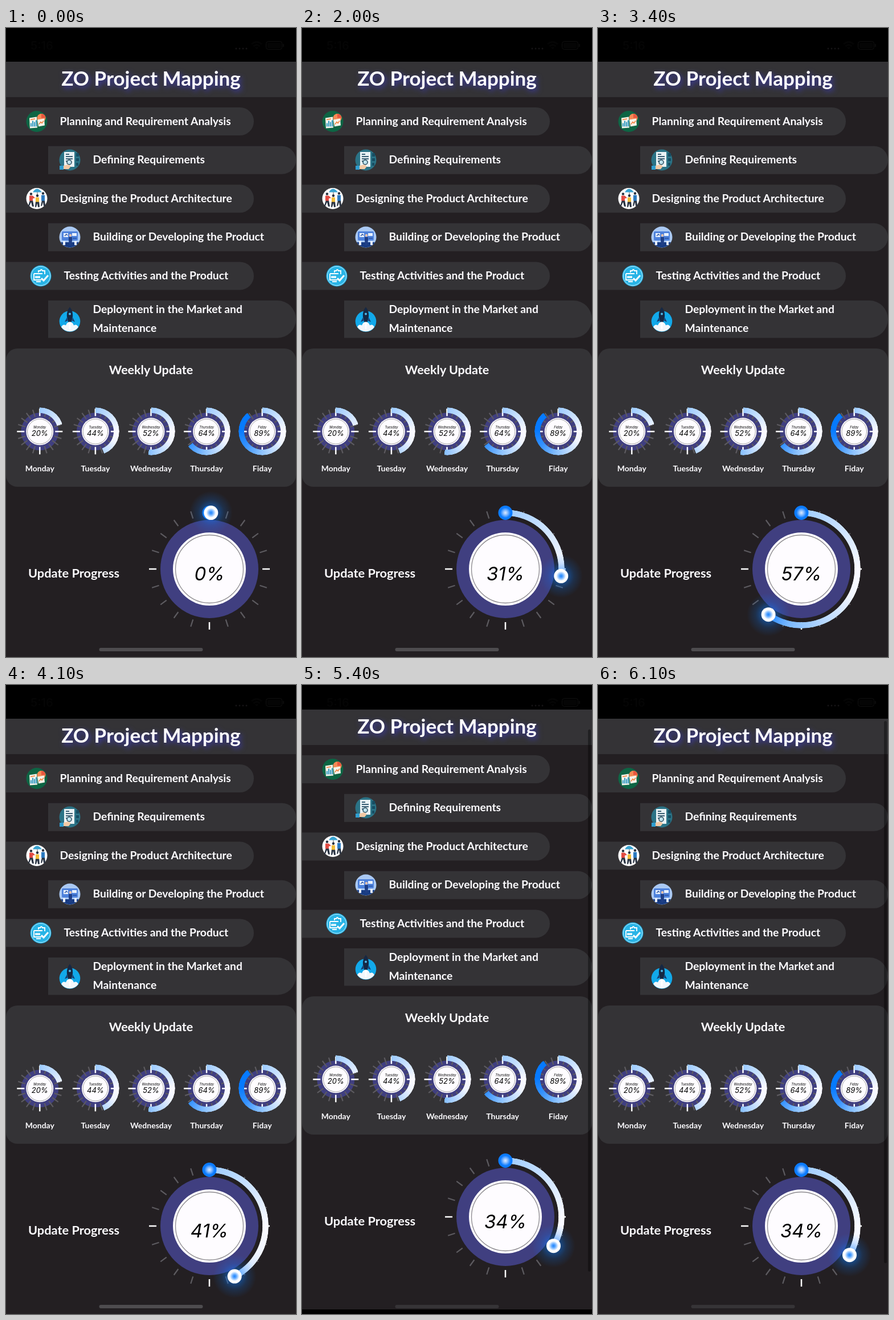
These frames come from a looping animation (509 px wide and 1101 px high, 6.2 s). An HTML page:

```html
<!DOCTYPE html>
<html lang="en">
<head>
<meta charset="utf-8">
<title>Project planning</title>
<style>
  html, body { margin: 0; width: 100%; height: 100%; overflow: hidden; background: #000; }
  #stage { position: relative; width: 509px; height: 1101px; overflow: hidden; background: #000; }
  #page { position: absolute; left: 0; top: 0; width: 509px; height: 1109px; }
  svg { position: absolute; left: 0; top: 0; overflow: visible; }
  text { font-family: Lato, sans-serif; font-weight: 700; fill: #fdfcff; }
  text.mid { text-anchor: middle; }
  text.num { font-family: Inter, sans-serif; font-weight: 400; font-style: italic; fill: #000; text-anchor: middle; }
  .title { filter: drop-shadow(3px 4px 5px #3b3aa6); }
  .ring, .sweep { position: absolute; border-radius: 50%; }
  .sweep {
    inset: 0;
    background: conic-gradient(#9ccbff 0, #fbfaff 25%, #f1f5ff 33%, #8cc2ff 51%, #3491ff 64%, #067aff 76%, #067aff);
  }
</style>
</head>
<body>
<div id="stage">
  <div id="page">
    <svg id="base" width="509" height="1109">
      <rect y="59" width="509" height="1050" fill="#231f22"/>
      <g fill="#343336">
        <rect y="59" width="509" height="62"/>
        <rect y="561" width="509" height="242" rx="20"/>
        <g id="cards"></g>
      </g>
      <text class="mid title" x="254.5" y="101" font-size="35">ZO Project Mapping</text>
      <text class="mid" x="254.5" y="606" font-size="21.5">Weekly Update</text>
      <text x="39" y="962" font-size="21.8">Update Progress</text>

      <g transform="translate(54 163.5)">
        <circle r="18.5" fill="#0d6544"/>
        <circle cx="8" cy="-6" r="7.5" fill="#f58a55"/>
        <path d="M8-6V-13.5A7.5 7.5 0 0 1 15.5-6Z" fill="#e9573f"/>
        <path d="M-13-6 0-8 1 11-12 12ZM1-3 13-5 14 7 3 9Z" fill="#f6f3ea"/>
        <path d="M-10 9V3M-7 9V-1M-4 9V1M-1 9V-2" stroke="#2f9ac4" stroke-width="2"/>
        <path d="M-11-3-3-4.5M4 5 7 1 9 3 12-1" fill="none" stroke="#f0803c" stroke-width="1.5"/>
      </g>
      <g transform="translate(112 231)">
        <circle r="18.5" fill="#2b7386"/>
        <rect x="-10" y="-14" width="18" height="26" fill="#e9f2f5"/>
        <path d="M-7-10H-1M-7-6H5M-7-2H5M-7 2H2" stroke="#3a6075" stroke-width="1.8"/>
        <path d="M11-12h5v6h-5zM11-3h5v5h-5zM11 5h4v5h-4z" fill="#164d63"/>
        <circle cx="-1" cy="4" r="4" fill="#bfe3ee" stroke="#24485a" stroke-width="1.5"/>
        <path d="M-18 10H-11V17H-18Z" fill="#2f9ed0"/>
        <path d="M-11 10-3 8 2 11-2 16H-11Z" fill="#f3c9a5"/>
      </g>
      <g transform="translate(54 298.5)">
        <circle r="18.5" fill="#fdfdfd"/>
        <path d="M-7-11Q0-23 9-11Z" fill="#38a3d1"/>
        <path d="M1-11V-3" stroke="#555" stroke-width="1"/>
        <g fill="#26303f">
          <circle cx="-10" cy="-8" r="2.2"/><circle cx="1" cy="-5" r="2.2"/><circle cx="11" cy="-9" r="2.2"/>
          <path d="M-12 3H-7L-5 14H-8L-10 6-13 13H-15ZM-2 5H4L5 15H2L1 8-1 15H-3ZM9 3H14L15 13H12L11 6 9 13H7Z"/>
        </g>
        <path d="M-13-5H-7L-3-1-7 0V4H-13Z" fill="#e24b43"/>
        <path d="M-2-2H4V6H-2Z" fill="#f2bd38"/>
        <path d="M8-6H14V4H8Z" fill="#2b7ac0"/>
      </g>
      <g transform="translate(112 366)">
        <circle r="18.5" fill="#aac9f3"/>
        <path d="M-16 9H16A18.5 18.5 0 0 1-16 9Z" fill="#183c83"/>
        <rect x="-14" y="-10" width="28" height="16" rx="2" fill="#4e82dc"/>
        <path d="M-11-7H-3V0H-11ZM4-7H12V-2H4Z" fill="#e7f1ff"/>
        <path d="M-9-2-6-5-4-3M5 2H12" fill="none" stroke="#234e9d" stroke-width="1.3"/>
        <circle cx="1" cy="-3" r="2.2" fill="#f4c3a8"/>
        <path d="M-2 0H4V6L3 14H-1L-2 6Z" fill="#1f3f86"/>
        <path d="M-12 14V7H-8V14M8 14V7H12V14" fill="#e8effb"/>
      </g>
      <g transform="translate(61 434)" fill="none" stroke="#fff" stroke-width="1.8">
        <circle r="18.5" fill="#28b4e6" stroke="none"/>
        <circle r="16.6" stroke="#b9e8fa" stroke-width="1"/>
        <path d="M-4-6V-9H-1Q1-13 3-9H7V-3M-12-4H3M-12-4V7H1M-8 10H0"/>
        <path d="M-10 0H-1V4H-10Z" fill="#d9f3fc" stroke="none"/>
        <path d="M1 4 5 8 13-1" stroke-width="3"/>
      </g>
      <g transform="translate(112 511.5)">
        <circle cy="2" r="18.3" fill="#12a9ea"/>
        <path d="M-15 12Q-12 6-7 9-4 2 0 4 4 2 7 9 12 6 15 12A18.3 18.3 0 0 1-15 12Z" fill="#f2f7fc"/>
        <path d="M-2 2H2L1 16H-1Z" fill="#fff"/>
        <path d="M-5-5-9 3-4 1ZM5-5 9 3 4 1Z" fill="#173b70"/>
        <path d="M0-23Q6-16 5-6L3 3H-3L-5-6Q-6-16 0-23Z" fill="#152844"/>
        <circle cy="-11" r="2" fill="#4fb9e9"/>
      </g>
      <g id="dials"></g>
    </svg>
    <div id="rings"></div>
    <svg id="knobs" width="509" height="1109">
      <defs>
        <radialGradient id="capFill">
          <stop offset="0" stop-color="#dcebff"/><stop offset=".3" stop-color="#8fc0ff"/>
          <stop offset=".72" stop-color="#0b7bff"/><stop offset="1" stop-color="#0b7bff"/>
        </radialGradient>
        <radialGradient id="knobFill">
          <stop offset="0" stop-color="#1b84ff"/><stop offset=".25" stop-color="#5aa6ff"/>
          <stop offset=".68" stop-color="#fff"/><stop offset="1" stop-color="#fff"/>
        </radialGradient>
        <radialGradient id="glowFill">
          <stop offset=".25" stop-color="#0b7bff" stop-opacity=".5"/>
          <stop offset=".6" stop-color="#0b7bff" stop-opacity=".18"/>
          <stop offset="1" stop-color="#0b7bff" stop-opacity="0"/>
        </radialGradient>
      </defs>
      <circle cx="357" cy="848.5" r="12.5" fill="url(#capFill)"/>
      <g id="knob">
        <circle r="38" fill="url(#glowFill)"/>
        <circle r="12.5" fill="url(#knobFill)"/>
      </g>
    </svg>
  </div>
  <svg width="509" height="1101">
    <g id="status">
      <text x="43" y="37.5" font-size="20" style="font-family:Inter,sans-serif;font-weight:600;fill:#050505">5:16</text>
      <g fill="#161416">
        <circle cx="404" cy="36" r="1.5"/><circle cx="410" cy="36" r="1.5"/>
        <circle cx="416" cy="36" r="1.5"/><circle cx="422" cy="36" r="1.5"/>
      </g>
      <g fill="none" stroke="#050505" stroke-width="3">
        <path d="M431 28.5Q440 20.500 449 28.500M434.500 32Q440 27 445.500 32"/>
        <path d="M440 37.500 437 34.500Q440 32 443 34.500Z" fill="#050505" stroke="none"/>
        <rect x="456.500" y="23.500" width="28" height="14" rx="4" stroke="#111" stroke-width="1"/>
        <rect x="458.500" y="25.500" width="24" height="10" rx="2.500" fill="#050505" stroke="none"/>
        <path d="M487 28V33" stroke="#111" stroke-width="1.500"/>
      </g>
    </g>
    <rect id="bar" x="502" width="5" rx="2.5" fill="#000" opacity=".38"/>
    <rect id="home" x="163.500" y="1085" width="182" height="6" rx="3"/>
  </svg>
</div>
<script>
const LOOP = 6200, STEP = 100, SCROLL_START = 4800;
const $ = id => document.getElementById(id);

function add(parent, tag, attrs, content = '') {
  const node = document.createElementNS('http://www.w3.org/2000/svg', tag);
  for (const key in attrs) node.setAttribute(key, attrs[key]);
  node.textContent = content;
  return parent.appendChild(node);
}

// Tasks: side, top, height, text x, lines
const tasks = [
  ['left', 139, 49, 94.5, 'Planning and Requirement Analysis'],
  ['right', 206.7, 49, 152.5, 'Defining Requirements'],
  ['left', 274.3, 49, 94.5, 'Designing the Product Architecture'],
  ['right', 341.8, 49, 152.5, 'Building or Developing the Product'],
  ['left', 409.4, 49, 101.5, 'Testing Activities and the Product'],
  ['right', 477, 65.5, 152.5, 'Deployment in the Market and', 'Maintenance']
];
for (const [side, top, height, textX, ...lines] of tasks) {
  const r = height / 2, x = side === 'left' ? 0 : 74;
  add($('cards'), 'path', { d: `M${x} ${top}h${435 - r}a${r} ${r} 0 0 1 0 ${height}h${r - 435}z` });
  lines.forEach((line, i) => add($('cards'), 'text', {
    x: textX, y: top + r + 6 + (i - (lines.length - 1) / 2) * 33, 'font-size': 19.3
  }, line));
}

function makeRing(x, y, inner, outer) {
  const ring = document.createElement('div'), sweep = document.createElement('div');
  const mask = `radial-gradient(circle, transparent ${inner - .4}px, #000 ${inner + .4}px)`;
  ring.className = 'ring';
  sweep.className = 'sweep';
  Object.assign(ring.style, {
    left: x - outer + 'px', top: y - outer + 'px',
    width: outer * 2 + 'px', height: outer * 2 + 'px', webkitMaskImage: mask, maskImage: mask
  });
  ring.append(sweep);
  $('rings').append(ring);
  return percent => {
    const cut = `conic-gradient(#000 ${percent}%, transparent ${percent + .1}%)`;
    sweep.style.webkitMaskImage = cut;
    sweep.style.maskImage = cut;
  };
}

function makeDial(x, y, size) {
  const g = add($('dials'), 'g', { transform: `translate(${x} ${y})` });
  add(g, 'circle', { r: size.disc, fill: '#403f80' });
  for (let i = 0; i < 20; i++) {
    const major = i % 5 === 0;
    add(g, 'path', {
      d: `M0 ${-size.tickIn}V${-size.tickOut}`, transform: `rotate(${i * 18})`,
      stroke: major ? '#fff' : '#5d5b60', 'stroke-width': major ? 2.5 : 2.2
    });
  }
  add(g, 'circle', { r: size.face, fill: '#fefcff' });
  add(g, 'circle', { r: size.line, fill: 'none', stroke: '#8d8b8f', 'stroke-width': size.lineWidth });
  return { g, setArc: makeRing(x, y, size.arcIn, size.arcOut) };
}

const small = { disc: 33, tickIn: 27, tickOut: 40, face: 24, line: 21.8, lineWidth: .8, arcIn: 32, arcOut: 42 };
const large = { disc: 86, tickIn: 93, tickOut: 106, face: 64, line: 59.5, lineWidth: 1.3, arcIn: 93.2, arcOut: 103.8 };

const days = [['Monday', 20], ['Tuesday', 44], ['Wednesday', 52], ['Thursday', 64], ['Fiday', 89]];
days.forEach(([day, percent], i) => {
  const x = 59.3 + i * 97.6;
  const { g, setArc } = makeDial(x, 706.3, small);
  setArc(percent);
  add(g, 'text', { class: 'num', y: -5.5, 'font-size': 5.7 }, day);
  add(g, 'text', { class: 'num', y: 8, 'font-size': 13 }, percent + '%');
  add(g, 'text', { class: 'mid', y: 69.5, 'font-size': 14 }, day);
});

const progress = makeDial(357, 947, large);
const progressText = add(progress.g, 'text', { class: 'num', y: 20, 'font-size': 33 });

// Dragged position in percent over time
const drag = [
  [700, .45], [1200, 2.3], [1300, 3.2], [1600, 11], [2000, 27], [2700, 56.5], [2800, 61],
  [3100, 69], [3400, 60], [4100, 42.6], [4200, 41], [4600, 33.6]
];
// Overscroll distance per step, counted from the start of the scroll
const overscroll = [58, 102.7, 110, 110, 76, 38, 16, 7, 3, 1];

function slope(keys, i) {
  const a = keys[i - 1], b = keys[i], c = keys[i + 1];
  if (!a || !c || (b[1] - a[1]) * (c[1] - b[1]) <= 0) return 0;
  return (c[1] - a[1]) / (c[0] - a[0]);
}

function curve(keys, t) {
  if (t <= keys[0][0]) return keys[0][1];
  const i = keys.findIndex(key => key[0] >= t);
  if (i < 0) return keys[keys.length - 1][1];
  const [t0, v0] = keys[i - 1], [t1, v1] = keys[i], span = t1 - t0, u = (t - t0) / span;
  const m0 = slope(keys, i - 1) * span, m1 = slope(keys, i) * span;
  return v0 + u * (m0 + u * (3 * (v1 - v0) - 2 * m0 - m1 + u * (2 * (v0 - v1) + m0 + m1)));
}

function draw(t) {
  const percent = curve(drag, t), angle = percent / 50 * Math.PI;
  progress.setArc(percent);
  // The number runs one step ahead of the eased knob
  progressText.textContent = Math.round(curve(drag, t < 700 ? t : t + STEP)) + '%';
  $('knob').setAttribute('transform',
    `translate(${357 + 98.5 * Math.sin(angle)} ${947 - 98.5 * Math.cos(angle)})`);

  const scrolling = t >= SCROLL_START;
  const offset = scrolling ? overscroll[(t - SCROLL_START) / STEP] || 0 : 0;
  $('page').style.transform = `translateY(${-offset}px)`;
  $('bar').style.display = scrolling ? '' : 'none';
  $('bar').setAttribute('y', 63 + offset * .925);
  $('bar').setAttribute('height', 949 - Math.max(0, offset - 16) * 1.15);
  $('home').setAttribute('fill', scrolling ? '#363437' : '#4e4c4f');
}

let shown = -1;
function tick() {
  const t = Math.floor(performance.now() % LOOP / STEP) * STEP;
  if (t !== shown) draw(shown = t);
  requestAnimationFrame(tick);
}
tick();
</script>
</body>
</html>
```
